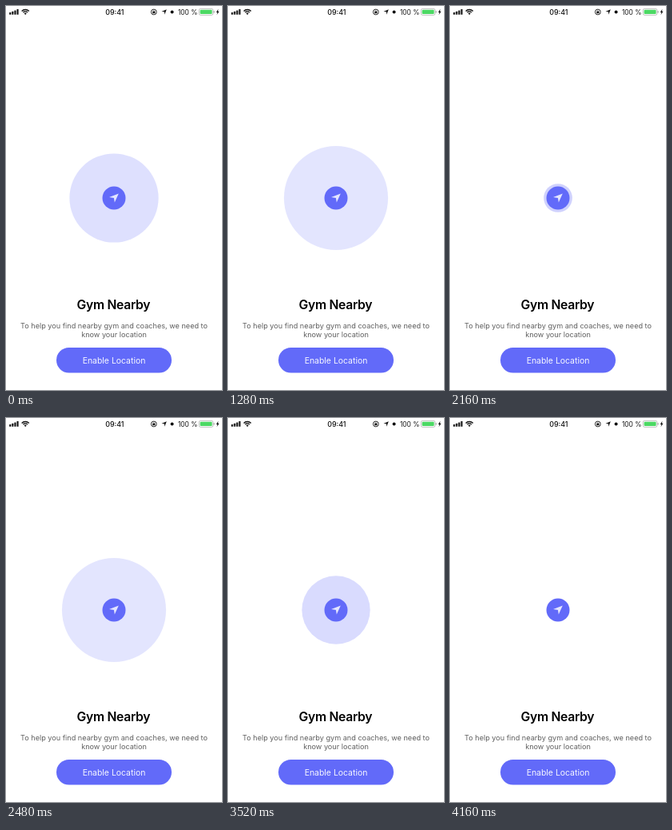
An HTML page with a canvas for the animation above (4560 ms loop, 270x480 px).

```html
<!DOCTYPE html>
<html lang="en">
<head>
<meta charset="utf-8">
<title>Gym Nearby</title>
<style>
  html, body { margin: 0; width: 100%; height: 100%; overflow: hidden; background: #fff; }
  canvas { display: block; width: 270px; height: 480px; }
</style>
</head>
<body>
<canvas id="stage"></canvas>
<script>
const WIDTH = 270, HEIGHT = 480;
const LOOP = 4560, STEP = 40;
const PULSE = { period: 1200, offset: 280, duration: 800, from: 15.7, to: 81.7, alpha: 0.32 };
const CENTER = { x: 135, y: 240 };
const BLUE = '#626af9';
const INK = '#111';

const canvas = document.getElementById('stage');
const ctx = canvas.getContext('2d');
const ratio = window.devicePixelRatio || 1;
canvas.width = WIDTH * ratio;
canvas.height = HEIGHT * ratio;
ctx.scale(ratio, ratio);

function bezier(a, b, u) {
  return 3 * a * u * (1 - u) ** 2 + 3 * b * u * u * (1 - u) + u ** 3;
}

// cubic-bezier(.25, .1, .25, 1), solved by bisection
function ease(x) {
  let low = 0, high = 1;
  for (let i = 0; i < 20; i++) {
    const mid = (low + high) / 2;
    if (bezier(0.25, 0.25, mid) < x) low = mid; else high = mid;
  }
  return bezier(0.1, 1, low);
}

function disc(x, y, r, color) {
  ctx.fillStyle = color;
  ctx.beginPath();
  ctx.arc(x, y, r, 0, Math.PI * 2);
  ctx.fill();
}

function pill(x, y, w, h, r, color) {
  ctx.fillStyle = color;
  ctx.beginPath();
  ctx.roundRect(x, y, w, h, r);
  ctx.fill();
}

function polygon(points, color) {
  ctx.fillStyle = color;
  ctx.beginPath();
  points.forEach(([x, y]) => ctx.lineTo(x, y));
  ctx.closePath();
  ctx.fill();
}

function arc(x, y, r, start, end, width) {
  ctx.strokeStyle = INK;
  ctx.lineWidth = width;
  ctx.beginPath();
  ctx.arc(x, y, r, start, end);
  ctx.stroke();
}

function label(text, x, y, size, weight, color, spacing = 0) {
  ctx.font = `${weight} ${size}px Inter, Roboto, sans-serif`;
  ctx.letterSpacing = `${spacing}px`;
  ctx.textAlign = 'center';
  ctx.fillStyle = color;
  ctx.fillText(text, x, y);
}

function drawStatusBar() {
  for (let i = 0; i < 4; i++) {
    const h = 2.8 + i * 1.3;
    pill(4.2 + i * 3.1, 10.8 - h, 2.1, h, 0.5, INK);
  }

  const up = -Math.PI / 2, spread = 0.8;
  for (const r of [3.9, 6.3]) arc(24.2, 10.8, r, up - spread, up + spread, 1.4);
  ctx.fillStyle = INK;
  ctx.beginPath();
  ctx.moveTo(24.2, 11);
  ctx.arc(24.2, 10.8, 2.2, up - spread, up + spread);
  ctx.fill();

  label('09:41', 135.8, 10.7, 8.9, 500, INK);

  arc(184.8, 7.5, 3.4, 0, Math.PI * 2, 0.9);
  pill(183.2, 7, 3.2, 2.3, 0.4, INK);
  arc(184.8, 7, 1.1, Math.PI, 0, 0.7);

  polygon([[200.8, 4.2], [194.4, 7.1], [198, 7.2], [198.2, 10.8]], INK);
  disc(207.6, 7.5, 2, INK);
  label('100 %', 227.2, 10.7, 8.4, 400, INK);

  ctx.strokeStyle = '#999';
  ctx.lineWidth = 0.6;
  ctx.beginPath();
  ctx.roundRect(241.3, 3.4, 17.6, 8, 2);
  ctx.stroke();
  pill(242.6, 4.7, 15, 5.4, 1, '#4cd964');
  pill(259.5, 6, 1, 2.8, 0.5, '#999');
  polygon([[265.4, 3.8], [262.8, 8], [264.3, 8], [263.6, 11], [266.5, 6.7], [264.9, 6.7]], INK);
}

function drawContent() {
  disc(CENTER.x, CENTER.y, 14.5, BLUE);
  polygon([[140.8, 234.4], [129, 239], [134.9, 239.9], [135.8, 245.6]], '#e3e5ff');

  label('Gym Nearby', 134.4, 378.8, 15.7, 600, '#000', -0.3);
  label('To help you find nearby gym and coaches, we need to', 135, 402.6, 9.15, 400, '#5f5f5f');
  label('know your location', 135, 413.6, 9.15, 400, '#5f5f5f');
  pill(63, 427, 144, 31.5, 15.75, BLUE);
  label('Enable Location', 135, 446.9, 10.45, 400, '#f6f7ff');
}

function drawPulse(time) {
  const progress = ((time + PULSE.offset - STEP) % PULSE.period + STEP) / PULSE.duration;
  if (progress >= 1) return;
  const radius = PULSE.from + (PULSE.to - PULSE.from) * ease(progress);
  ctx.globalAlpha = PULSE.alpha * (1 - progress);
  disc(CENTER.x, CENTER.y, radius, BLUE);
  ctx.globalAlpha = 1;
}

let start;
function frame(now) {
  start ??= now;
  const time = Math.floor(((now - start) % LOOP) / STEP) * STEP;
  ctx.fillStyle = '#fff';
  ctx.fillRect(0, 0, WIDTH, HEIGHT);
  drawPulse(time);
  drawStatusBar();
  drawContent();
  requestAnimationFrame(frame);
}
requestAnimationFrame(frame);
</script>
</body>
</html>
```
